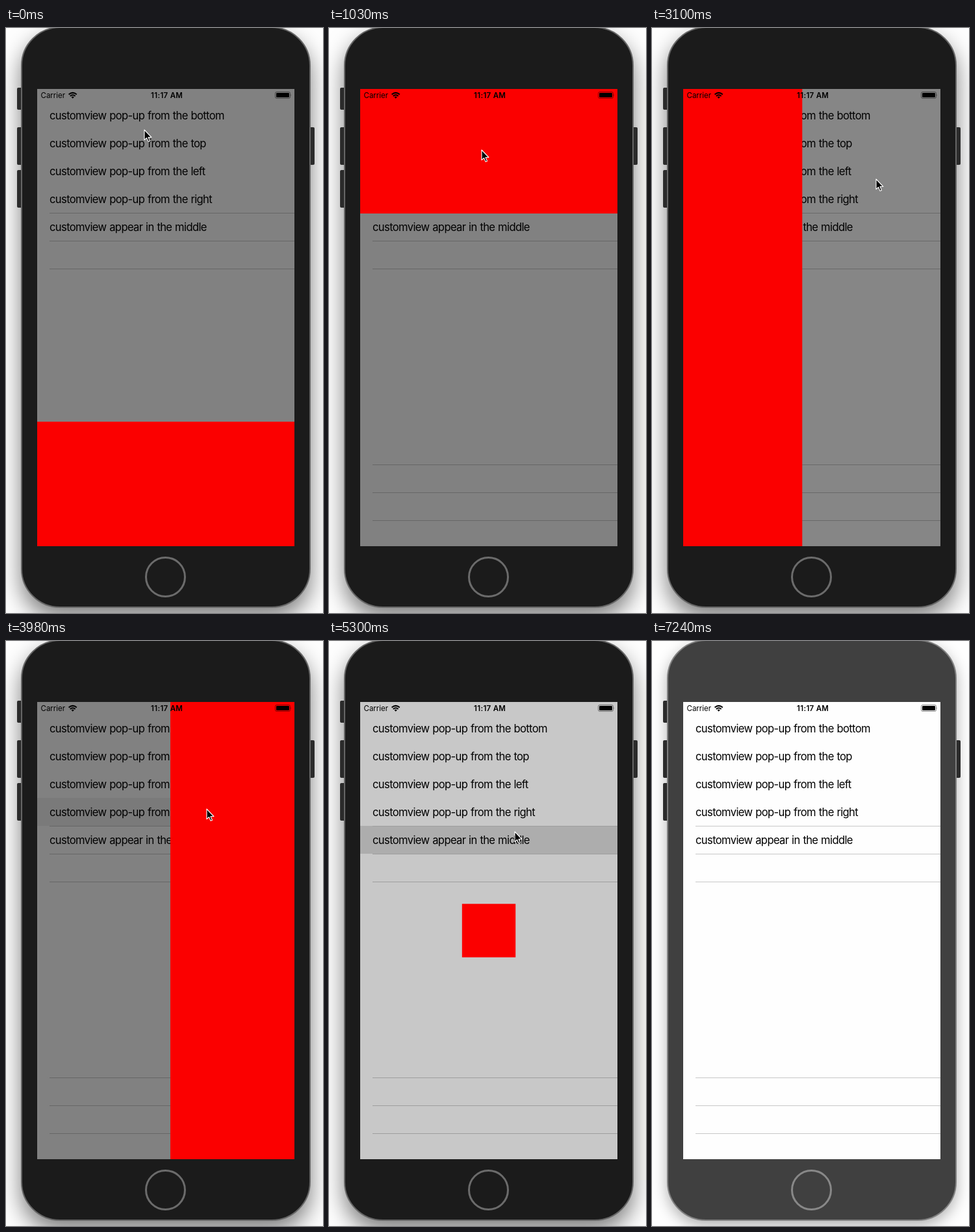
An HTML page for the animation above (7.34 s loop, 488x902 px).

```html
<!DOCTYPE html>
<html lang="en">
<head>
<meta charset="utf-8">
<title>Pop-up panels</title>
<style>
  html, body { margin: 0; width: 100%; height: 100%; overflow: hidden; background: #fefefe; }
  #stage { position: relative; width: 488px; height: 902px; overflow: hidden; }
  #phone {
    position: absolute; left: 23px; top: -2px; width: 446px; height: 896px;
    box-sizing: border-box; border: 2px solid #666; border-radius: 60px;
    background: #1b1b1b; box-shadow: 0 16px 34px rgba(0, 0, 0, .5);
  }
  .idle #phone { background: #404040; border-color: #808080; box-shadow: 0 8px 22px rgba(0, 0, 0, .3); }
  svg { position: absolute; left: 0; top: 0; }
  text { font-family: Inter, Roboto, sans-serif; fill: #000; }
  #rows text { font-size: 16.6px; letter-spacing: -.64px; word-spacing: .7px; }
  .status text { font-size: 11.5px; }
  .status .clock { font-weight: 600; letter-spacing: .3px; }
  #home { fill: none; stroke: #6b6b6b; stroke-width: 3; }
  .idle #home { stroke: #888; }
</style>
</head>
<body>
<div id="stage">
  <div id="phone"></div>
  <svg width="488" height="902" viewBox="0 0 488 902">
    <defs><clipPath id="screen"><rect x="48" y="94" width="396" height="705"/></clipPath></defs>
    <g fill="#2b2b2b">
      <path d="M23 92H19q-2 0-2 2v30q0 2 2 2h4z"/>
      <path id="key" d="M23 153H19q-2 0-2 2v54q0 2 2 2h4z"/>
      <use href="#key" y="66"/>
      <path d="M469 153h4q2 0 2 2v54q0 2-2 2h-4z"/>
    </g>
    <circle id="home" cx="245.5" cy="846.5" r="30"/>
    <g clip-path="url(#screen)">
      <rect x="48" y="94" width="396" height="705" fill="#fefefe"/>
      <rect id="glow" x="48" width="396" height="43" fill="#d9d9d9"/>
      <g id="rows"></g>
      <rect id="dim" x="48" y="94" width="396" height="705"/>
      <rect id="panel" fill="#fb0000"/>
      <g class="status">
        <text x="53.5" y="108">Carrier</text>
        <text class="clock" x="247.7" y="108" text-anchor="middle">11:17 AM</text>
        <path d="M96.6 102.6q6.1-5.4 12.2 0M98.8 105q3.9-3.4 7.8 0" fill="none" stroke="#000" stroke-width="2"/>
        <path d="M100.6 106.4q2.1-1.6 4.2 0l-2.1 2.3z"/>
        <rect x="414.5" y="98.5" width="23" height="10" rx="2.4" fill="none" stroke="#000" stroke-opacity=".45"/>
        <rect x="416" y="100" width="20" height="7" rx="1.2"/>
        <path d="M438.4 102q1.4 1.5 0 3z" fill-opacity=".5"/>
      </g>
    </g>
    <path id="cursor" d="M0 0V15.6L3.5 12.4 6.1 18.2 8.5 17.2 6 11.5H10.9Z"
      stroke="#fff" stroke-width="1.1" stroke-linejoin="round"/>
  </svg>
</div>
<script>
const LOOP = 7340, IDLE_AT = 7240, TICK = 147.5;
const SLIDE = 1.9, GLIDE = 2, EXIT = 44;   // in ticks
const PITCH = 43.1;

// Ticks at which a panel opens and closes; the pointer taps `tap`, then `away`.
const scenes = [
  { side: 'bottom', open: -5, close: 1, tap: [213, 157], away: [213, 157] },
  { side: 'top', open: 5, close: 10, tap: [235, 188], away: [243, 318] },
  { side: 'left', open: 15, close: 20.77, tap: [248, 234], away: [345, 233] },
  { side: 'right', open: 25, close: 30, tap: [309, 259], away: [222, 266] },
  { side: 'middle', open: 35.14, close: 39, tap: [286, 294], away: [286, 294] }
];
const stops = scenes.flatMap(s => [[s.open - 2, s.tap], [s.close, s.away]]);
stops.push([EXIT, [398, 846]]);

const panels = {
  bottom: p => [48, 799 - 192 * p, 396, 192],
  top: p => [48, 94 - 192 * (1 - p), 396, 192],
  left: p => [48 - 191 * (1 - p), 94, 191, 705],
  right: p => [444 - 191 * p, 94, 191, 705],
  middle: p => [246 - 96 * p, 446.5 - 96 * p, 192 * p, 192 * p]
};

const $ = id => document.getElementById(id);

function set(el, attrs) {
  for (const name in attrs) el.setAttribute(name, attrs[name]);
}

function add(tag, attrs, label = '') {
  const el = document.createElementNS('http://www.w3.org/2000/svg', tag);
  set(el, attrs);
  el.textContent = label;
  $('rows').append(el);
}

function ease(x) {
  x = Math.min(1, Math.max(0, x));
  return x * x * (3 - 2 * x);
}

function pointerAt(n) {
  let [x, y] = stops[0][1];
  for (const [arrive, [tx, ty]] of stops) {
    const k = ease((n - arrive) / GLIDE + 1);
    x += (tx - x) * k;
    y += (ty - y) * k;
  }
  return `translate(${x} ${y})`;
}

scenes.forEach(({ side }, i) => {
  const how = side === 'middle' ? 'appear in the ' : 'pop-up from the ';
  add('text', { x: 67, y: Math.round(141 + PITCH * i) }, 'customview ' + how + side);
});
for (let i = 0; i < 12; i++) {
  if (i > 2 && i < 9) continue;
  add('rect', { x: 67, y: Math.round(285 + PITCH * i), width: 377, height: 1, fill: '#c8c8c8' });
}

function draw(t) {
  const n = Math.floor((t + 10) / TICK);
  const row = Math.max(0, scenes.findLastIndex(s => n >= s.open));
  const { side, open, close } = scenes[row];

  const p = ease((n - open) / SLIDE) - ease((n - close) / SLIDE);
  const [x, y, width, height] = panels[side](p);
  set($('panel'), { x, y, width, height });
  set($('dim'), { opacity: p * .495 });

  const glow = n > open ? 1 - ease((n - open - .4) / 2.8) : 0;
  set($('glow'), { y: 113 + 43 * row, opacity: glow });

  set($('cursor'), { transform: pointerAt(n), opacity: n > EXIT ? 0 : 1 });
  $('stage').classList.toggle('idle', t >= IDLE_AT);
}

const start = performance.now();
function tick() {
  draw((performance.now() - start) % LOOP);
  requestAnimationFrame(tick);
}
tick();
</script>
</body>
</html>
```
